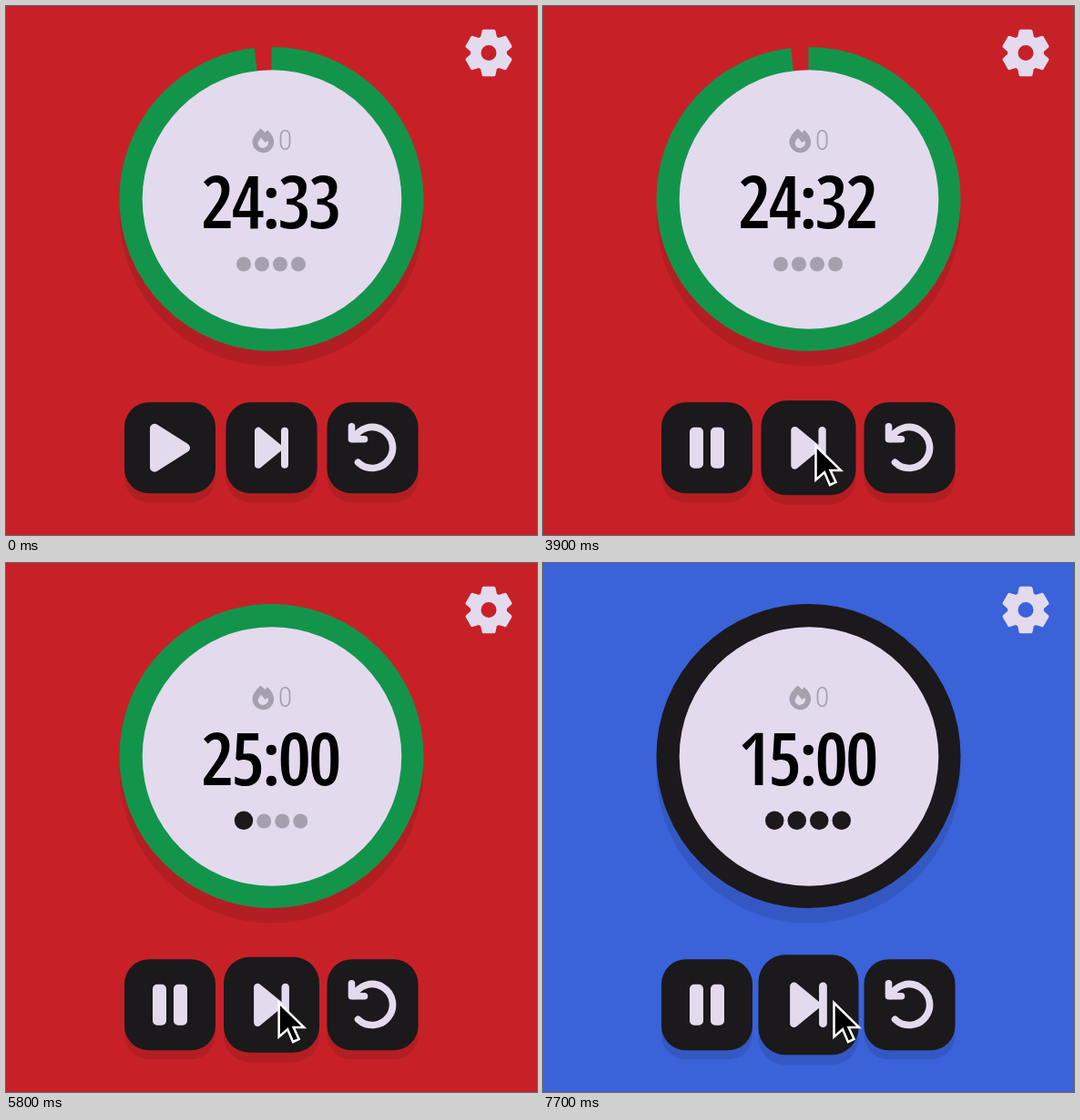
An HTML page for the animation above (8 s loop, 583 px wide and 581 px high).

```html
<!DOCTYPE html>
<html lang="en">
<head>
<meta charset="utf-8">
<title>Focus timer</title>
<style>
  html, body { margin: 0; width: 100%; height: 100%; overflow: hidden; background: #c72127; }
  svg { display: block; width: 583px; height: 581px; }
  text { font-stretch: condensed; text-anchor: middle; }
  #clock {
    font: 700 82px "Open Sans Condensed", "Roboto Condensed", Roboto, sans-serif;
    letter-spacing: -4.5px;
    stroke: #e3daee;
    stroke-width: 2;
  }
  #streak {
    font-family: "Roboto Condensed", "Open Sans", sans-serif;
    font-size: 32px;
    font-weight: 300;
    fill: #a59fae;
  }
  .icon { fill: #e3daee; stroke: #e3daee; stroke-linejoin: round; stroke-linecap: round; }
</style>
</head>
<body>
<svg viewBox="0 0 583 581">
  <defs>
    <g id="key">
      <rect x="-50" y="-40" width="100" height="100" rx="27" opacity=".1"/>
      <rect x="-50" y="-50" width="100" height="100" rx="27" fill="#1b191b"/>
    </g>
  </defs>
  <rect id="back" width="583" height="581"/>
  <path id="gear" class="icon" stroke-width="4" fill-rule="evenodd"/>

  <circle cx="291.5" cy="228.5" r="167" opacity=".1"/>
  <circle id="gap" cx="291.5" cy="212" r="167"/>
  <circle id="ring" cx="291.5" cy="212" r="154" fill="none" stroke-width="26"
    pathLength="1" transform="rotate(-90 291.5 212)"/>
  <circle cx="292" cy="212.5" r="142.3" fill="#e3daee"/>
  <path transform="translate(270.5 134)" fill="#a59fae" fill-rule="evenodd"
    d="M9 .4L14 5L16.5 2.3Q23.7 9 23.7 15.5A11.8 12 0 0 1 0 14.7Q0 9 9 .4Z
       M12 22Q19 20 17 13.7L14 16L9.5 10.5Q6 15 6 17Q7 22 12 22Z"/>
  <text id="streak" x="306.5" y="158">0</text>
  <text id="clock" x="289" y="245"></text>
  <g id="dots"><circle/><circle/><circle/><circle/></g>

  <g id="play">
    <use href="#key"/>
    <path id="start" class="icon" stroke-width="10" d="M-17-21.5V21.5L17 0Z"/>
    <path id="pause" class="icon" stroke-width="10" d="M-14-17.5V17.5h5V-17.5ZM9-17.5V17.5h5V-17.5Z"/>
  </g>
  <g transform="translate(402.5 485.3)">
    <use href="#key"/>
    <path class="icon" style="fill:none" stroke-width="7.6"
      d="M-23-23.5V-9.5H-9M-21-9.5A22.5 22.5 0 1 1-16 16"/>
  </g>
  <g id="skip">
    <use href="#key"/>
    <path class="icon" stroke-width="8" d="M-14.5-18.5V18.5L8 0ZM14.5-18.5V18.5"/>
  </g>
  <path id="cursor" stroke="#fff" stroke-width="2.5" d="M.5 3V40.5L10 32L16 46L22.5 43L16.5 30H28Z"/>
</svg>
<script>
const $ = id => document.getElementById(id);
const LOOP = 8000, FADE = 150, PRESS = 200;
const RED = [199, 33, 39], GREEN = [18, 149, 75], BLUE = [58, 98, 217];
const DARK = [27, 25, 27], GREY = [165, 159, 174];

const focus = { back: RED, ring: GREEN, clock: '25:00' };
const rest = { back: GREEN, ring: DARK, clock: '05:00' };
const longRest = { back: BLUE, ring: DARK, clock: '15:00' };

const playClick = 2580;
const skipClicks = [3980, 4600, 5900, 6080, 6370, 6580, 7420];
const moves = [
  { from: 1800, to: 2300, x: 184, y: 492 },
  { from: 2700, to: 3300, x: 299, y: 480 },
  { from: 5800, to: 6050, x: 319, y: 480 }
];

const clamp = k => Math.max(0, Math.min(1, k));
const mix = (a, b, k) => a + (b - a) * k;
const mixColor = (a, b, k) => `rgb(${a.map((v, i) => Math.round(mix(v, b[i], k)))})`;

// Skips alternate focus and rest; the fourth rest is the long one
const modeAfter = skips => skips % 2 === 0 ? focus : skips === 7 ? longRest : rest;
const roundsAfter = skips => Math.ceil(skips / 2);

// A key grows while hovered and dips to its plain size around each click
function keyScale(t, enter, leave, clicks) {
  const hover = clamp((t - enter) / PRESS) * clamp((leave - t) / PRESS);
  const dip = Math.max(...clicks.map(click => clamp(1 - Math.abs(t - click) / PRESS)));
  return 1 + .1 * hover * (1 - dip);
}

function cursorAt(t) {
  let x = 194, y = 592;
  for (const move of moves) {
    const k = clamp((t - move.from) / (move.to - move.from));
    const ease = k * (2 - k);
    x = mix(x, move.x, ease);
    y = mix(y, move.y, ease);
  }
  return [x, y];
}

function gearPath() {
  let d = '';
  for (let tooth = 0; tooth < 6; tooth++)
    for (const [r, deg] of [[18, -23], [24.5, -13], [24.5, 13], [18, 23]]) {
      const a = (tooth * 60 + deg - 90) * Math.PI / 180;
      d += `${d ? 'L' : 'M'}${530 + r * Math.cos(a)} ${51.5 + r * Math.sin(a)}`;
    }
  return d + 'ZM519.5 51.5a10.5 10.5 0 1 0 21 0a10.5 10.5 0 1 0-21 0Z';
}

function drawDots(before, after, k) {
  const dots = [...$('dots').children];
  let x = 291 - (76 + 4.5 * mix(before, after, k)) / 2;
  dots.forEach((dot, i) => {
    const fill = mix(i < before, i < after, k);
    const r = 8 + 2.25 * fill;
    dot.setAttribute('cx', x + r);
    dot.setAttribute('cy', 283.5 - fill * .7);
    dot.setAttribute('r', r);
    dot.setAttribute('fill', mixColor(GREY, DARK, fill));
    x += 2 * r + 4;
  });
}

function place(id, x, y, scale = 1) {
  $(id).setAttribute('transform', `translate(${x} ${y}) scale(${scale})`);
}

function draw(t) {
  const skips = skipClicks.filter(click => click <= t).length;
  const last = Math.max(0, skips - 1);
  const mode = modeAfter(skips), oldMode = modeAfter(last);
  const k = skips ? clamp((t - skipClicks[last]) / FADE) : 1;
  const back = mixColor(oldMode.back, mode.back, k);
  const running = t >= playClick;
  const left = 1473 - clamp(Math.floor((t - playClick) / 1000));

  $('back').setAttribute('fill', back);
  $('gap').setAttribute('fill', back);
  $('ring').setAttribute('stroke', mixColor(oldMode.ring, mode.ring, k));
  $('ring').setAttribute('stroke-dasharray', skips ? 'none' : `${left / 1500} 1`);
  $('clock').textContent = skips ? mode.clock : `24:${left % 60}`;
  drawDots(roundsAfter(last), roundsAfter(skips), k);

  $('start').style.display = running ? 'none' : '';
  $('pause').style.display = running ? '' : 'none';
  place('play', 180, 485.3, keyScale(t, 2050, 3200, [playClick]));
  place('skip', 291.5, 485.3, keyScale(t, 3050, Infinity, skipClicks));
  place('cursor', ...cursorAt(t));
}

$('gear').setAttribute('d', gearPath());
const begin = performance.now();
function frame() {
  draw((performance.now() - begin) % LOOP);
  requestAnimationFrame(frame);
}
frame();
</script>
</body>
</html>
```
